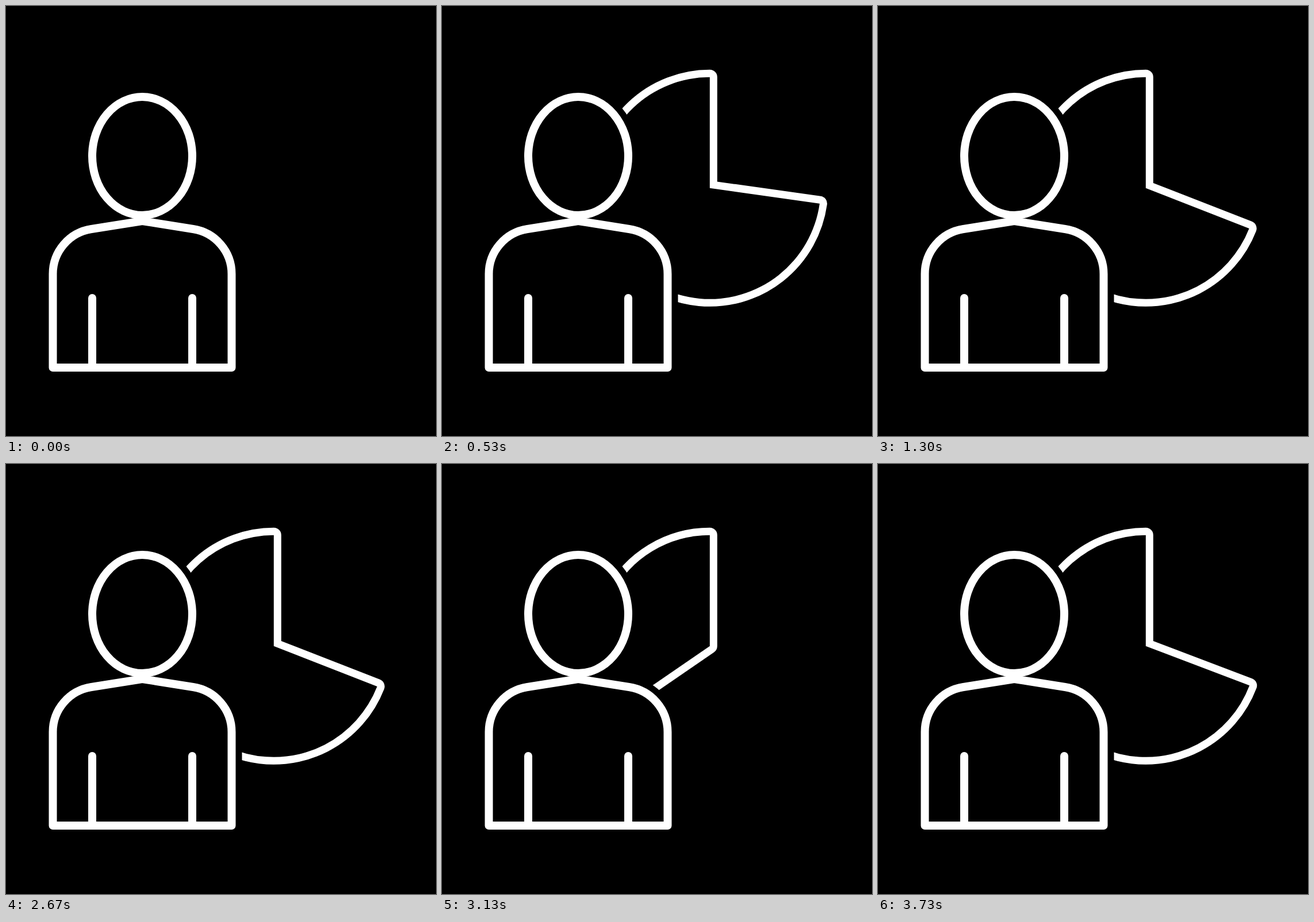
Animation, 748 px wide and 748 px high, one loop 3760 ms. Source, as an HTML page:

```html
<!DOCTYPE html>
<html lang="en">
<head>
<meta charset="utf-8">
<title>Person with pie chart</title>
<style>
  html, body { margin: 0; width: 100%; height: 100%; overflow: hidden; background: #000; }
  svg { display: block; width: 100%; height: 100%; }
  .pie { fill: #000; stroke: #fff; stroke-width: 26; stroke-linejoin: round; paint-order: stroke; }
  .gap { fill: #000; stroke: #000; stroke-width: 36; }
  .line { fill: none; stroke: #fff; stroke-width: 14; stroke-linecap: round; stroke-linejoin: round; }
</style>
</head>
<body>
<svg viewBox="0 0 748 748">
  <defs>
    <g id="person">
      <ellipse cx="237" cy="261" rx="87" ry="103"/>
      <path d="M237 374 L325.4 388 A79 79 0 0 1 392.5 466 V629 H81.5 V466 A79 79 0 0 1 148.6 388 Z"/>
    </g>
  </defs>
  <path id="pie" class="pie"/>
  <use href="#person" class="gap"/>
  <use href="#person" class="line"/>
  <path class="line" d="M150 508 V629 M324 508 V629"/>
</svg>
<script>
  const LOOP = 3760, STEP = 100 / 3, REPLAY = 81;
  const CX = 465.8, CY = 316.8, R = 193;
  const pie = document.getElementById('pie');

  // [step, sweep in degrees, slope in degrees per step]
  const keys = [
    [0, 0, 0], [9, 43.3, 14.2], [13, 124.5, 34], [16, 262, 45],
    [19, 330, 0], [24, 266.8, -8], [31, 249.2, -0.3], [37, 248.7, 0]
  ];

  function sweepAt(step) {
    const i = keys.findIndex(k => k[0] > step);
    if (i < 0) return keys[keys.length - 1][1];
    const [t0, a, m0] = keys[i - 1], [t1, b, m1] = keys[i];
    const d = t1 - t0, u = (step - t0) / d, v = 1 - u;
    return v * v * ((1 + 2 * u) * a + u * d * m0) + u * u * ((3 - 2 * u) * b - v * d * m1);
  }

  function sector(deg) {
    if (deg <= 0) return '';
    const r = deg * Math.PI / 180;
    const x = CX - R * Math.sin(r), y = CY - R * Math.cos(r);
    return `M${CX} ${CY} V${CY - R} A${R} ${R} 0 ${deg > 180 ? 1 : 0} 0 ${x.toFixed(2)} ${y.toFixed(2)} Z`;
  }

  function draw() {
    const step = Math.floor((performance.now() % LOOP + 3.4) / STEP);
    pie.setAttribute('d', sector(sweepAt(step < REPLAY ? step : step - REPLAY)));
    requestAnimationFrame(draw);
  }
  draw();
</script>
</body>
</html>
```
